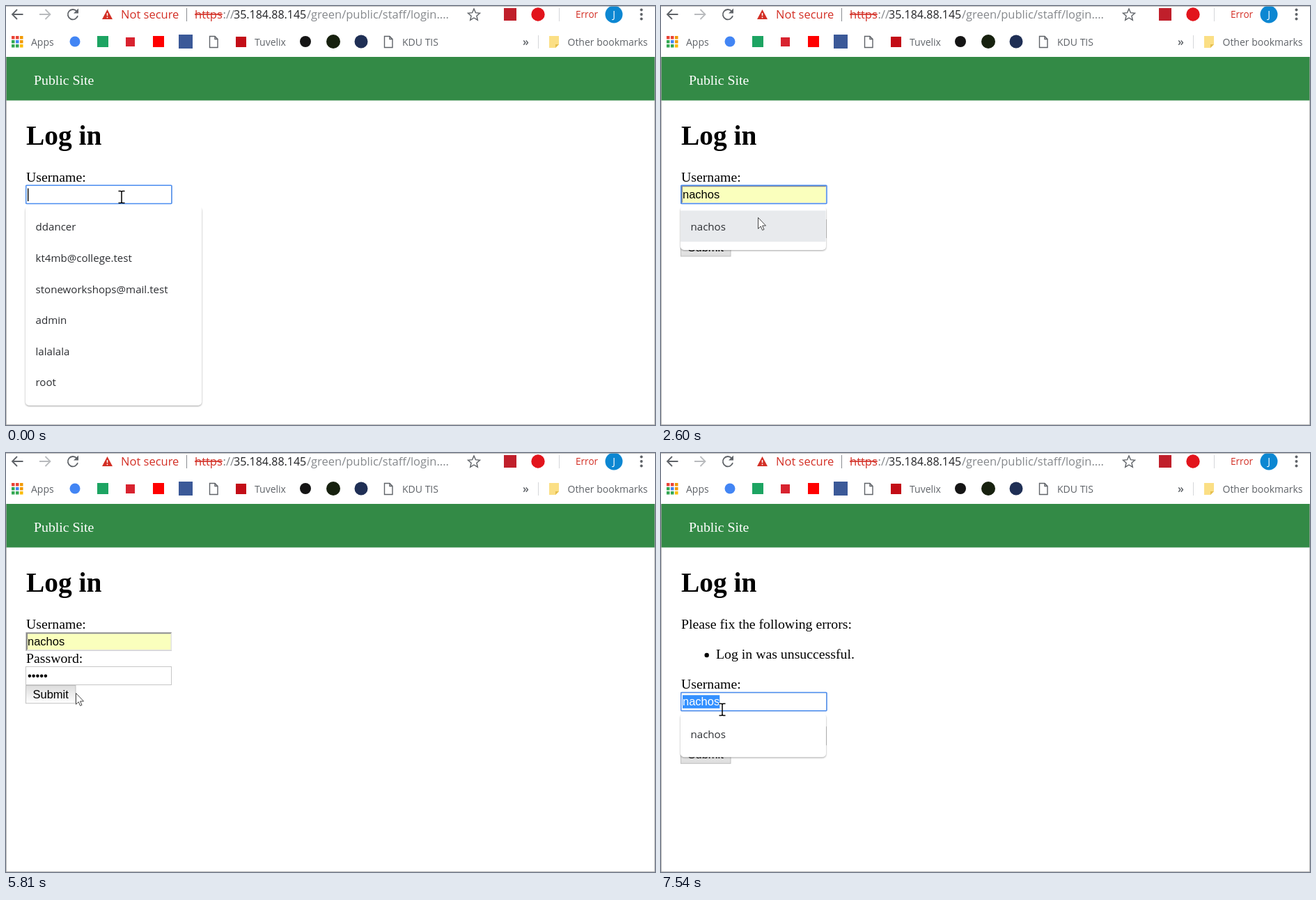
An HTML page that plays this animation: 932 by 601 pixels, repeating every 8000 ms.

```html
<!DOCTYPE html>
<html lang="en">
<head>
<meta charset="utf-8">
<title>Log in</title>
<style>
  html, body { margin: 0; width: 100%; height: 100%; overflow: hidden; background: #fff; }
  svg { display: block; width: 100vw; height: 100vh; }
  text { white-space: pre; }
  .ui { font-family: "Open Sans", "Noto Sans", sans-serif; font-size: 14px; fill: #5f6368; }
  .url { font-size: 16.5px; }
  .item { font-size: 15.1px; fill: #2b2d31; }
  .doc { font-family: "Liberation Serif", serif; font-size: 19.8px; }
  .field { font-family: "Liberation Sans", sans-serif; font-size: 16.5px; }
  .line { fill: none; stroke: #5f6368; stroke-width: 1.8; }
  .thin { stroke-width: 1.4; }
  .edge { fill: #fff; stroke: #c6c6c6; }
  .ring { fill: none; stroke: #4a8cf0; stroke-width: 1.5; }
  #panel { fill: #fff; filter: drop-shadow(0 1.5px 1.2px rgba(0,0,0,.36)); }
</style>
</head>
<body>
<svg viewBox="0 0 932 601">
  <defs>
    <linearGradient id="up" x2="0" y2="1"><stop stop-color="#fbfbfb"/><stop offset="1" stop-color="#dcdcdc"/></linearGradient>
    <linearGradient id="over" x2="0" y2="1"><stop stop-color="#fff"/><stop offset="1" stop-color="#e6e6e6"/></linearGradient>
    <linearGradient id="down" x2="0" y2="1"><stop stop-color="#dcdcdc"/><stop offset="1" stop-color="#fff"/></linearGradient>
    <linearGradient id="fresh" x2="0" y2="1"><stop offset=".88" stop-color="#fff"/><stop offset=".92" stop-color="#cfcfcf"/></linearGradient>
    <path id="file" class="line thin" d="M-5.5-8H2L6-4V8H-5.5ZM2-8V-4H6"/>
  </defs>
  <rect width="932" height="601" fill="#fff"/>

  <!-- address bar -->
  <path class="line" d="M24.500 12H9.500M16 5L9 12L16 19"/>
  <path class="line" d="M48 12H63M56.500 5L63.500 12L56.500 19" style="stroke:#b9bbbe"/>
  <g id="reload">
    <path class="line" d="M101.500 7.500A7.200 7.200 0 1 0 103 14"/>
    <path d="M104 3.500V10.500H97Z" fill="#5f6368"/>
  </g>
  <path id="stop" class="line" d="M89.500 5.500L102.500 18.500M102.500 5.500L89.500 18.500"/>
  <path d="M145.500 5L153 19H138Z" fill="#d32f25"/>
  <path d="M145.500 10V14M145.500 15.500V17.200" stroke="#fff" stroke-width="1.5"/>
  <g class="ui url">
    <text x="165" y="18" fill="#d32f25">Not secure</text>
    <text x="271" y="18" fill="#d32f25" text-decoration="line-through">https</text>
    <text x="311.500" y="18" fill="#85888c">://</text>
    <text x="327" y="18" fill="#202124" font-size="16">35.184.88.145</text>
    <text x="432" y="18" fill="#85888c">/green/public/staff/login....</text>
  </g>
  <path d="M259.500 3V22" stroke="#8a8d91"/>
  <path d="M794.500 3V22M764.500 42V61" stroke="#d5d7da"/>
  <path class="line thin" d="M672 4L674.400 9.600L680.500 10.200L675.900 14.200L677.300 20.200L672 17L666.700 20.200L668.100 14.200L663.500 10.200L669.600 9.600Z"/>
  <rect x="715" y="3" width="18" height="18" fill="#c01f2b"/>
  <circle cx="764" cy="12" r="9.700" fill="#e2141c"/>
  <text class="ui" x="818" y="17" style="fill:#d32f25;font-size:13.6px">Error</text>
  <circle cx="873" cy="12" r="12.500" fill="#0c87d2"/>
  <text class="ui" x="873" y="17" text-anchor="middle" style="fill:#fff">J</text>
  <g fill="#5f6368"><circle cx="912.500" cy="5.500" r="2"/><circle cx="912.500" cy="12" r="2"/><circle cx="912.500" cy="18.500" r="2"/></g>

  <!-- bookmarks -->
  <g id="apps"></g>
  <circle cx="99" cy="51" r="7.500" fill="#4285f4"/>
  <rect x="131" y="43" width="16" height="16" fill="#1da462"/>
  <rect x="172" y="45" width="13" height="13" fill="#d8232f"/>
  <rect x="211" y="43" width="16" height="16" fill="#f00"/>
  <rect x="248" y="41" width="20" height="20" fill="#3b5998"/>
  <use href="#file" x="298" y="51.500"/>
  <rect x="330" y="44" width="15" height="15" fill="#c30d17"/>
  <circle cx="430" cy="51" r="8" fill="#151515"/>
  <circle cx="470" cy="51" r="10" fill="#17210f"/>
  <circle cx="510" cy="51" r="9.500" fill="#1f2f55"/>
  <use href="#file" x="549" y="51.500"/>
  <path d="M780 43H794V55L789 60H780Z" fill="#fbdf85"/>
  <path d="M794 55H789V60Z" fill="#e5be4d"/>
  <g class="ui">
    <text x="36" y="56.500">Apps</text>
    <text x="357" y="56.500">Tuvelix</text>
    <text x="569" y="56.500">KDU TIS</text>
    <text x="742" y="56.500" font-weight="600" style="font-size:16px">»</text>
    <text x="806.500" y="56.500">Other bookmarks</text>
  </g>

  <!-- page -->
  <rect y="73" width="932" height="62.500" fill="#338a46"/>
  <text class="doc" x="40" y="113" fill="#fff">Public Site</text>
  <text class="doc" x="29" y="199" font-weight="bold" style="font-size:39.4px">Log in</text>
  <g id="errors" class="doc">
    <text x="29" y="252">Please fix the following errors:</text>
    <circle cx="65.700" cy="290" r="3.200"/>
    <text x="79" y="295">Log in was unsuccessful.</text>
  </g>
  <g id="form">
    <text class="doc" x="29" y="252">Username:</text>
    <rect class="edge" x="28.500" y="257.500" width="209" height="26"/>
    <g id="filled">
      <rect x="29" y="257.500" width="209" height="26" fill="#e2e2e2"/>
      <path d="M29 283.500V257.500H238L236 259.500H31V281.500Z" fill="#8b8b8b"/>
      <rect x="31" y="259.500" width="205.500" height="22.500" fill="#faffbd"/>
    </g>
    <rect id="userRing" class="ring" x="28.750" y="257.250" width="209.250" height="26.250" rx="1"/>
    <rect id="selection" x="31" y="261" height="19" fill="#3390ff"/>
    <text id="user" class="field" x="31" y="276"></text>
    <g transform="translate(0 49)">
      <text class="doc" x="29" y="252">Password:</text>
      <rect class="edge" x="28.500" y="257.500" width="209" height="26"/>
      <rect id="passRing" class="ring" x="28.750" y="257.250" width="209.250" height="26.250" rx="1"/>
      <text id="pass" class="field" x="31" y="276"></text>
    </g>
    <rect id="button" x="28.500" y="333.500" width="71.500" height="25.500" stroke="#c0c0c0"/>
    <text class="field" x="38.500" y="352">Submit</text>
    <rect id="caret" width="1.400" height="18.500" fill="#000"/>
    <g id="menu">
      <rect id="panel" x="28" y="288" rx="5"/>
      <rect id="lid" x="28.500" y="285" height="12" fill="#fff"/>
      <rect id="hot" x="28" y="293.500" width="208.500" height="44.600" fill="#e8eaed"/>
      <g id="items" class="ui"></g>
    </g>
  </g>
  <path d="M.5 73V601M931.500 73V601M0 600.500H932M0 .5H932" stroke="#a4a4a4" stroke-opacity=".75"/>

  <path id="beam" d="M-4.500-8.500H-1.500Q0-8.500 0-7V7Q0 8.500-1.500 8.500H-4.500M4.500-8.500H1.500Q0-8.500 0-7M0 7Q0 8.500 1.500 8.500H4.500" fill="none" stroke="#000" stroke-width="1.500"/>
  <path id="arrow" d="M.5.500V16.500L4.200 13L6.600 18.500L9 17.500L6.600 12.100H11.500Z" fill="#fff" stroke="#333" stroke-width=".9"/>
</svg>
<script>
const LOOP = 8000, NAME = 'nachos', ROW = 44.6, PAGE_SHIFT = 86.3;
const $ = id => document.getElementById(id);
const show = (id, on) => $(id).setAttribute('visibility', on ? 'inherit' : 'hidden');
const set = (id, attrs) => { for (const k in attrs) $(id).setAttribute(k, attrs[k]); };

const menus = {
  none: [],
  all: ['ddancer', 'kt4mb@college.test', 'stoneworkshops@mail.test', 'admin', 'lalalala', 'root'],
  two: [NAME, 'napkin'],
  one: [NAME]
};

const beam = (x, y) => ({ pointer: 'beam', x, y });
const arrow = (x, y) => ({ pointer: 'arrow', x, y });

// Each step changes only the listed parts of the state.
const steps = [
  [0, { typed: 0, dots: 0, focus: 'user', caret: true, menu: 'all', hot: false, filled: false,
        selected: 0, button: 'up', loading: false, failed: false, ...beam(166, 274) }],
  [420, { caret: false }],
  [920, { typed: 1, caret: true, menu: 'two' }],
  [1040, { typed: 2 }],
  [1200, { typed: 3, menu: 'one' }],
  [1320, { typed: 4 }],
  [1470, { typed: 5 }],
  [1610, { typed: 6 }],
  [2150, { caret: false }],
  [2450, arrow(148, 293)],
  [2600, { filled: true, hot: true, ...arrow(139, 303) }],
  [2900, { menu: 'none', hot: false, caret: true, ...arrow(137, 304) }],
  [3020, beam(124, 313)],
  [3150, beam(106, 326)],
  [3270, beam(98, 331)],
  [3410, { focus: 'pass' }],
  [3980, { caret: false }],
  [4280, { dots: 2, caret: true }],
  [4430, { dots: 4 }],
  [4680, { dots: 5 }],
  [5110, { caret: false, ...beam(83, 309) }],
  [5260, beam(79, 326)],
  [5540, { button: 'over', ...arrow(93, 339) }],
  [5670, { caret: true, ...arrow(100, 344) }],
  [5810, { focus: 'button', button: 'down', caret: false }],
  [5930, { loading: true, button: 'up' }],
  [6080, { loading: false, failed: true, filled: false, dots: 0, focus: '', button: 'fresh', ...arrow(112, 352) }],
  [6210, arrow(168, 384)],
  [6340, beam(214, 410)],
  [6480, arrow(298, 449)],
  [6620, arrow(404, 471)],
  [6760, arrow(414, 474)],
  [6890, arrow(140, 399)],
  [7030, beam(84, 375)],
  [7150, beam(37, 361)],
  [7300, { focus: 'user', caret: true }],
  [7420, { selected: 3, caret: false, ...beam(58, 364) }],
  [7540, { selected: 6, menu: 'one', button: 'up', ...beam(88, 368) }]
];

let state = {};
const states = steps.map(([, patch]) => state = { ...state, ...patch });

function drawMenu(name) {
  const list = menus[name], width = name === 'all' ? 253 : 209;
  show('menu', list.length);
  set('panel', { width, height: 17.4 + ROW * list.length });
  set('lid', { width: width - 1 });
  $('items').innerHTML = list.map((label, i) =>
    `<text class="item" x="42.5" y="${322.3 + ROW * i}">${label}</text>`).join('');
}

function drawUser(s) {
  const text = NAME.slice(0, s.typed), cut = s.selected;
  $('user').innerHTML = `<tspan fill="#fff">${text.slice(0, cut)}</tspan><tspan>${text.slice(cut)}</tspan>`;
  set('selection', { width: cut ? $('user').getSubStringLength(0, cut) : 0 });
}

function draw(s) {
  drawUser(s);
  $('pass').textContent = '•'.repeat(s.dots);
  show('userRing', s.focus === 'user');
  show('passRing', s.focus === 'pass');
  show('filled', s.filled);
  show('errors', s.failed);
  show('stop', s.loading);
  show('reload', !s.loading);
  set('form', { transform: `translate(0 ${s.failed ? PAGE_SHIFT : 0})` });
  set('button', { fill: `url(#${s.button})` });

  const inPass = s.focus === 'pass';
  show('caret', s.caret);
  set('caret', {
    x: 31 + $(inPass ? 'pass' : 'user').getComputedTextLength() * !s.failed,
    y: inPass ? 310.5 : 261.5
  });

  drawMenu(s.menu);
  show('hot', s.hot);
  for (const id of ['beam', 'arrow']) show(id, s.pointer === id);
  set(s.pointer, { transform: `translate(${s.x} ${s.y})` });
}

const appColors = ['#ea4335', '#ea4335', '#f29900', '#34a853', '#4285f4', '#f29900', '#34a853', '#34a853', '#fbbc05'];
$('apps').innerHTML = appColors.map((fill, i) =>
  `<rect x="${8 + i % 3 * 6}" y="${43 + Math.floor(i / 3) * 6}" width="4.5" height="4.5" fill="${fill}"/>`).join('');

const start = performance.now();
let shown = -1;
function tick() {
  const time = (performance.now() - start) % LOOP;
  const index = steps.filter(([at]) => at <= time).length - 1;
  if (index !== shown) draw(states[shown = index]);
  requestAnimationFrame(tick);
}
tick();
</script>
</body>
</html>
```
